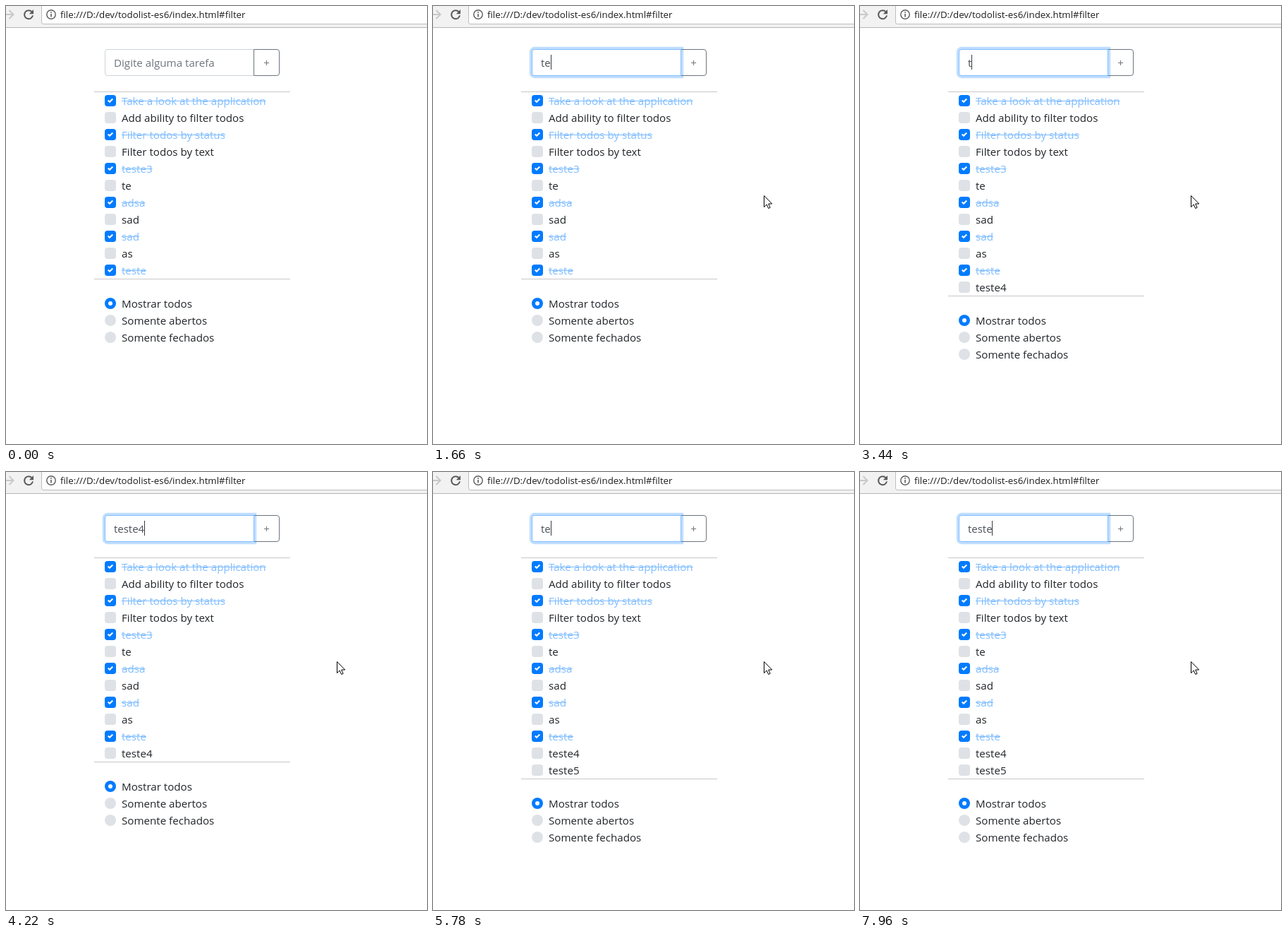
Recreate the animation shown at these times as an HTML page. Size 597 px wide and 620 px high, loop 8 s.

```html
<!DOCTYPE html>
<html lang="pt">
<head>
<meta charset="utf-8">
<title>Todo list</title>
<style>
html, body { margin: 0; width: 100%; height: 100%; overflow: hidden; background: #fff; }
#stage { position: relative; width: 597px; height: 620px; overflow: hidden;
  font: 15.15px/24px "Open Sans", "Noto Sans", sans-serif; color: #212529; }
#stage * { box-sizing: border-box; }
#stage > *, .row svg { position: absolute; }
#bar { left: 0; top: 0; width: 597px; height: 31px; background: #f2f2f2; border-bottom: 1px solid #b6b6b6; }
#url { left: 50px; top: -4px; width: 560px; height: 30px; background: #fff; border: 1px solid #bdbdbd; border-radius: 3px; }
#address { left: 77px; top: 2px; font-size: 13.3px; line-height: 20px; color: #1c1c1c; white-space: nowrap; }
#icons { left: 0; top: 0; }
#field { left: 140px; top: 61px; width: 212px; height: 38px; padding: 6px 12px; font-size: 15px;
  border: 1px solid #ced4da; border-radius: 4px 0 0 4px; background: #fff; color: #495057; white-space: pre; }
#hint { position: absolute; left: 12px; top: 6px; font-size: 15.15px; color: #6c757d; }
#caret { position: absolute; top: 7px; width: 1px; height: 21px; margin-left: -.15px; background: #343a40; }
#add { left: 351px; top: 61px; width: 37px; height: 38px; line-height: 36px; z-index: 2; text-align: center;
  border: 1px solid #6c757d; border-radius: 0 4px 4px 0; color: #6c757d; }
.rule { left: 125px; width: 278px; height: 1px; background: #c8c8c8; }
.row { left: 140px; height: 24px; padding-left: 24px; white-space: nowrap; }
.row svg { left: 0; top: 4px; }
.done { color: #80bdff; text-decoration: line-through; text-decoration-thickness: 1px; }
#mouse { left: 0; top: 0; z-index: 9; }
</style>
</head>
<body>
<div id="stage">
  <div id="bar"></div>
  <div id="url"></div>
  <svg id="icons" width="75" height="30" fill="none">
    <path d="M0 12H10M4.5 6L10.5 12L4.5 18" stroke="#c9c9c9" stroke-width="2"/>
    <path d="M36.6 8.2A6 6 0 1 0 38 13.4" stroke="#5a5a5a" stroke-width="2"/>
    <path d="M39 5v6.2h-6.2z" fill="#5a5a5a"/>
    <circle cx="64" cy="12" r="6.2" stroke="#5a5a5a" stroke-width="1.4"/>
    <path d="M64 11v4.5M64 8v1.7" stroke="#5a5a5a" stroke-width="1.6"/>
  </svg>
  <div id="address">file:///D:/dev/todolist-es6/index.html#filter</div>
  <div id="field"><span id="hint">Digite alguma tarefa</span><span id="typed"></span><span id="caret"></span></div>
  <div id="add">+</div>
  <div class="rule" style="top:121px"></div>
  <svg id="mouse" width="597" height="620">
    <path id="arrow" d="M.5 .5V16.6L4.2 13L6.7 18.5L9.1 17.4L6.7 12H11.7Z" fill="#fff" stroke="#000"/>
    <path id="beam" d="M-3 -7.5H-1L0 -6.5L1 -7.5H3M0 -6.5V7.5M-3 8.5H-1L0 7.5L1 8.5H3" fill="none" stroke="#000"/>
  </svg>
</div>
<script>
const LOOP = 8000;
const $ = id => document.getElementById(id);
const stage = $('stage');

function add(cls, html = '') {
  const el = document.createElement('div');
  el.className = cls;
  el.innerHTML = html;
  stage.append(el);
  return el;
}

const icon = inner => `<svg width="16" height="16">${inner}</svg>`;
const tint = on => on ? '#007bff' : '#dee2e6';
const check = on => icon(`<rect width="16" height="16" rx="4" fill="${tint(on)}"/>` +
  (on ? '<path transform="translate(4 4)" fill="#fff" d="M6.564.75l-3.59 3.612-1.538-1.55L0 4.26 2.974 7.25 8 2.193z"/>' : ''));
const radio = on => icon(`<circle cx="8" cy="8" r="8" fill="${tint(on)}"/>` +
  (on ? '<circle cx="8" cy="8" r="3" fill="#fff"/>' : ''));

// A leading * marks a finished task
const tasks = ['*Take a look at the application', 'Add ability to filter todos', '*Filter todos by status',
  'Filter todos by text', '*teste3', 'te', '*adsa', 'sad', '*sad', 'as', '*teste', 'teste4', 'teste5'];
const rows = tasks.map((task, i) => {
  const done = task[0] === '*';
  const text = done ? task.slice(1) : task;
  const row = add('row', check(done) + `<span class="${done ? 'done' : ''}">${text}</span>`);
  row.style.top = 122 + 24 * i + 'px';
  return row;
});
const rule = add('rule');
const filters = ['Mostrar todos', 'Somente abertos', 'Somente fechados']
  .map((text, i) => add('row', radio(i === 0) + text));

// time, typed text, caret, focus ring, task count
const states = [
  [0, '', 0, 0, 11],
  [720, '', 1, .25, 11], [800, '', 1, .7, 11], [870, '', 1, 1, 11], [1200, '', 0, 1, 11],
  [1660, 'te', 1, 1, 11], [1890, 'tes', 1, 1, 11], [2130, 'test', 1, 1, 11], [2190, 'teste', 1, 1, 11],
  [2660, 'teste4', 1, 1, 11],
  [2830, '', 1, 0, 12], [2910, '', 1, .5, 12], [2980, '', 1, 1, 12], [3380, '', 0, 1, 12],
  [3440, 't', 1, 1, 12], [3530, 'te', 1, 1, 12], [3760, 'tes', 1, 1, 12], [3840, 'test', 1, 1, 12],
  [3910, 'teste', 1, 1, 12], [4220, 'teste4', 1, 1, 12], [4770, 'teste4', 0, 1, 12],
  [5230, 'teste', 1, 1, 12], [5320, 'teste5', 1, 1, 12],
  [5550, '', 1, 0, 13], [5630, '', 1, .5, 13], [5700, '', 1, 1, 13],
  [5780, 'te', 1, 1, 13], [6020, 'tes', 1, 1, 13], [6100, 'test', 1, 1, 13], [6180, 'testr', 1, 1, 13],
  [6330, 'testre', 1, 1, 13], [6800, 'testr', 1, 1, 13], [7030, 'test', 1, 1, 13], [7110, 'teste', 1, 1, 13],
  [7580, 'teste', 0, 1, 13], [7650, 'test', 1, 1, 13], [7960, 'teste', 1, 1, 13]
];

// time, x, y of the pointer
const moves = [
  [0, -50, -50], [70, 488, 604], [140, 458, 510], [210, 408, 385], [280, 345, 250],
  [350, 288, 150], [420, 254, 98], [490, 242, 80],
  [800, 262, 94], [870, 345, 160], [950, 435, 240], [1030, 469, 268]
];

const at = (table, t) => table.findLast(step => step[0] <= t);
const mix = (a, b, k) => `rgb(${a.map((v, i) => Math.round(v + (b[i] - v) * k))})`;

function drawState([, text, caret, ring, count]) {
  $('typed').textContent = text;
  $('hint').hidden = text !== '';
  $('caret').style.visibility = caret ? 'visible' : 'hidden';
  $('caret').style.top = text ? '7px' : '8px';

  const field = $('field').style;
  field.zIndex = ring ? 3 : 1;
  field.borderColor = mix([206, 212, 218], [128, 189, 255], ring);
  field.boxShadow = `0 0 0 ${3.2 * ring}px rgba(0,123,255,${.25 * ring})`;

  rows.forEach((row, i) => row.hidden = i >= count);
  const end = 122 + 24 * count;
  rule.style.top = end + 'px';
  filters.forEach((row, i) => row.style.top = end + 23 + 24 * i + 'px');
}

function drawMouse([, x, y]) {
  const inField = y > 61 && y < 99 && x > 140 && x < 352;
  for (const id of ['arrow', 'beam']) {
    const shift = id === 'beam' ? .5 : 0;
    $(id).setAttribute('transform', `translate(${x + shift} ${y})`);
    $(id).style.display = (id === 'beam') === inField ? '' : 'none';
  }
}

let state, move;
function frame() {
  const t = performance.now() % LOOP;
  const nextState = at(states, t), nextMove = at(moves, t);
  if (nextState !== state) drawState(state = nextState);
  if (nextMove !== move) drawMouse(move = nextMove);
  requestAnimationFrame(frame);
}
frame();
</script>
</body>
</html>
```
